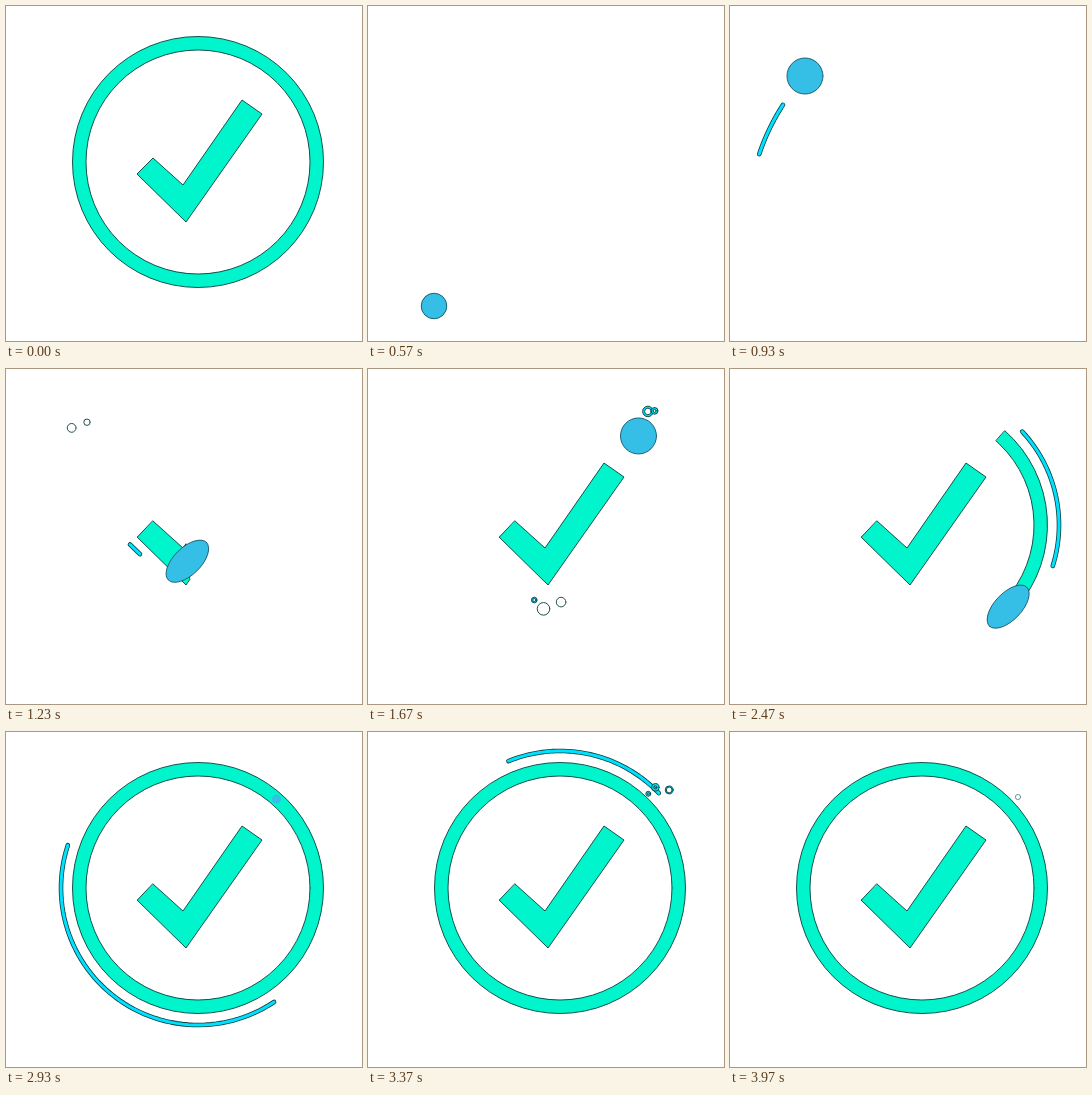
Write an HTML page with a canvas that moves like this. It is 356x335 px and loops after 4010 ms.

```html
<!DOCTYPE html>
<html lang="en">
<head>
<meta charset="utf-8">
<title>Check mark</title>
<style>
  html, body { margin: 0; width: 100%; height: 100%; overflow: hidden; background: #fff; }
  canvas { display: block; }
</style>
</head>
<body>
<canvas id="stage" width="356" height="335"></canvas>
<script>
const ctx = document.getElementById('stage').getContext('2d');
const LOOP = 4010, START = 500;
const MINT = '#00f5cc', BLUE = '#35bfe6', CYAN = '#00e1ff', EDGE = '#06403f';
const RING = { x: 192, y: 156, r: 118.7, outer: 125.5, inner: 112, from: -48.6 };
const RAD = Math.PI / 180;

const lerp = (a, b, k) => a + (b - a) * k;
const mix = (p, q, k) => [lerp(p[0], q[0], k), lerp(p[1], q[1], k)];
const clamp = k => Math.max(0, Math.min(1, k));
const polar = (x, y, r, deg) => [x + r * Math.cos(deg * RAD), y + r * Math.sin(deg * RAD)];

// Smooth interpolation through rising [time, value] keys.
function track(t, keys) {
  const last = keys.length - 1;
  if (t <= keys[0][0]) return keys[0][1];
  if (t >= keys[last][0]) return keys[last][1];
  const secant = i => (keys[i + 1][1] - keys[i][1]) / (keys[i + 1][0] - keys[i][0]);
  const slope = i => {
    if (i === 0 || i === last) return 0;
    const a = secant(i - 1), b = secant(i);
    return Math.min((a + b) / 2, 3 * a, 3 * b);
  };
  const i = keys.findIndex(k => k[0] > t) - 1;
  const [t0, v0] = keys[i], [t1, v1] = keys[i + 1];
  const d = t1 - t0, u = (t - t0) / d, u2 = u * u, u3 = u2 * u;
  return v0 * (2 * u3 - 3 * u2 + 1) + v1 * (3 * u2 - 2 * u3)
    + d * (slope(i) * (u3 - 2 * u2 + u) + slope(i + 1) * (u3 - u2));
}

function bezier([a, b, c, d], k) {
  const ab = mix(a, b, k), bc = mix(b, c, k), cd = mix(c, d, k);
  return mix(mix(ab, bc, k), mix(bc, cd, k), k);
}

// Ball route: launch, fall, short leg, long leg, exit, then round the ring.
const launch = [[66, 300], [22, 225], [38, 125], [75, 70]];
const fall = [[75, 70], [88, 58], [112, 132], [139, 160]];
const stops = [[139, 160], [178, 197], [246, 101], polar(RING.x, RING.y, RING.r, RING.from)];
const route = [[600, 0], [880, 1], [950, 1], [1140, 2], [1225, 3], [1410, 4], [1600, 5]];
const sweep = [[2200, -48.6], [2470, 43], [2600, 130], [2900, 311.4]];

function ballAt(t) {
  if (t > 2200) return polar(RING.x, RING.y, RING.r, track(t, sweep));
  const s = track(t, route);
  if (s < 1) return bezier(launch, s);
  if (s < 2) return bezier(fall, s - 1);
  const leg = Math.min(2, Math.floor(s - 2));
  return mix(stops[leg], stops[leg + 1], s - 2 - leg);
}

const streaks = [
  {
    path: k => polar(235, 217, 217, lerp(157.5, 213, k)),
    head: [[670, 0], [900, 1]],
    tail: [[740, 0], [930, .735], [1000, 1]]
  },
  {
    path: k => mix([124, 175.5], [163, 213], k),
    head: [[1185, 0], [1230, .25], [1400, 1]],
    tail: [[1230, 0], [1530, .25], [1640, 1]]
  },
  {
    path: k => polar(RING.x, RING.y, 137, lerp(-43, 317, k)),
    head: [[2320, 0], [2470, 1 / 6], [2600, .314], [2930, .669], [3130, .864], [3400, 1]],
    tail: [[2470, 0], [2630, .078], [2930, .275], [3130, .467], [3400, .842], [3600, 1]]
  }
];

// [start, life, x0, y0, x1, y1, radius]
const bubbles = [
  [940, 560, 75, 66, 64.5, 58, 4.4],
  [950, 540, 77, 63, 81.5, 52, 3.2],
  [1250, 800, 180, 205, 175, 244, 6.3],
  [1320, 720, 181, 208, 195, 237, 4.8],
  [1540, 460, 172, 219, 163, 238, 2.8],
  [1560, 680, 277, 47, 284, 36, 5.3],
  [1560, 620, 279, 45, 296, 38, 3.4],
  [3270, 730, 276, 60, 288, 65, 2.6],
  [3300, 560, 280, 58, 302, 50, 4.2],
  [3240, 410, 280, 60, 311, 57, 4]
];

function outline(color) {
  ctx.strokeStyle = color || EDGE;
  ctx.lineWidth = .9;
  ctx.stroke();
}

function circle(x, y, r) {
  ctx.moveTo(x + r, y);
  ctx.arc(x, y, r, 0, 2 * Math.PI);
}

function drawRing(to) {
  const { x, y, outer, inner, from } = RING;
  const full = to - from >= 359.9;
  if (to <= from) return;
  ctx.beginPath();
  if (full) {
    circle(x, y, outer);
    circle(x, y, inner);
  } else {
    ctx.arc(x, y, outer, from * RAD, to * RAD);
    ctx.arc(x, y, inner, to * RAD, from * RAD, true);
    ctx.closePath();
  }
  ctx.fillStyle = MINT;
  ctx.fill('evenodd');
  outline();
}

function drawCheck(p) {
  if (p <= 0) return;
  const left = [[131, 168], [180, 216], [256, 108]];
  const right = [[147, 152], [177, 179], [236, 94]];
  const leg = p > 1 ? 1 : 0, k = clamp(p - leg);
  const upTo = side => [...side.slice(0, leg + 1), mix(side[leg], side[leg + 1], k)];
  ctx.beginPath();
  [...upTo(left), ...upTo(right).reverse()].forEach(q => ctx.lineTo(...q));
  ctx.closePath();
  ctx.fillStyle = MINT;
  ctx.fill();
  outline();
}

function drawStreak({ path, head, tail }, t) {
  const a = track(t, tail), b = track(t, head);
  if (b - a < .002) return;
  ctx.beginPath();
  for (let i = 0; i <= 60; i++) ctx.lineTo(...path(lerp(a, b, i / 60)));
  ctx.lineCap = ctx.lineJoin = 'round';
  for (const [color, width] of [[EDGE, 4.6], [CYAN, 3]]) {
    ctx.strokeStyle = color;
    ctx.lineWidth = width;
    ctx.stroke();
  }
}

function drawBubble([start, life, x0, y0, x1, y1, radius], t) {
  const q = (t - start) / life;
  if (q <= 0 || q >= 1) return;
  const [x, y] = mix([x0, y0], [x1, y1], 1 - (1 - q) ** 3);
  const r = radius * Math.min(1, .4 + 4 * q);
  const band = Math.min(r * .6, 3 * Math.max(0, 1 - 2 * q));
  ctx.globalAlpha = q > .85 ? .6 : 1;
  ctx.beginPath();
  circle(x, y, r);
  if (band > .3) {
    circle(x, y, r - band);
    ctx.fillStyle = CYAN;
    ctx.fill('evenodd');
  }
  outline();
  ctx.globalAlpha = 1;
}

function drawBall(t) {
  const size = clamp((t - START) / 100) * clamp((2955 - t) / 95);
  if (size <= 0) return;
  const [x, y] = ballAt(t), a = ballAt(t - 12), b = ballAt(t + 12);
  const dx = b[0] - a[0], dy = b[1] - a[1];
  const stretch = 9 * Math.min(1, Math.hypot(dx, dy) / 24 * 1.4);
  ctx.beginPath();
  ctx.ellipse(x, y, (18 + stretch) * size, (18 - stretch / 2) * size, Math.atan2(dy, dx), 0, 2 * Math.PI);
  ctx.fillStyle = BLUE;
  ctx.fill();
  if (size > .45) outline('#14566a');
}

function draw(t) {
  ctx.fillStyle = '#fff';
  ctx.fillRect(0, 0, 356, 335);
  const done = t < START;
  drawRing(done ? 312 : track(t, sweep));
  drawCheck(done ? 2 : Math.min(2, track(t, route) - 2));
  if (done) return;
  streaks.forEach(s => drawStreak(s, t));
  bubbles.forEach(b => drawBubble(b, t));
  drawBall(t);
}

const origin = performance.now();
function tick() {
  draw((performance.now() - origin) % LOOP);
  requestAnimationFrame(tick);
}
tick();
</script>
</body>
</html>
```
